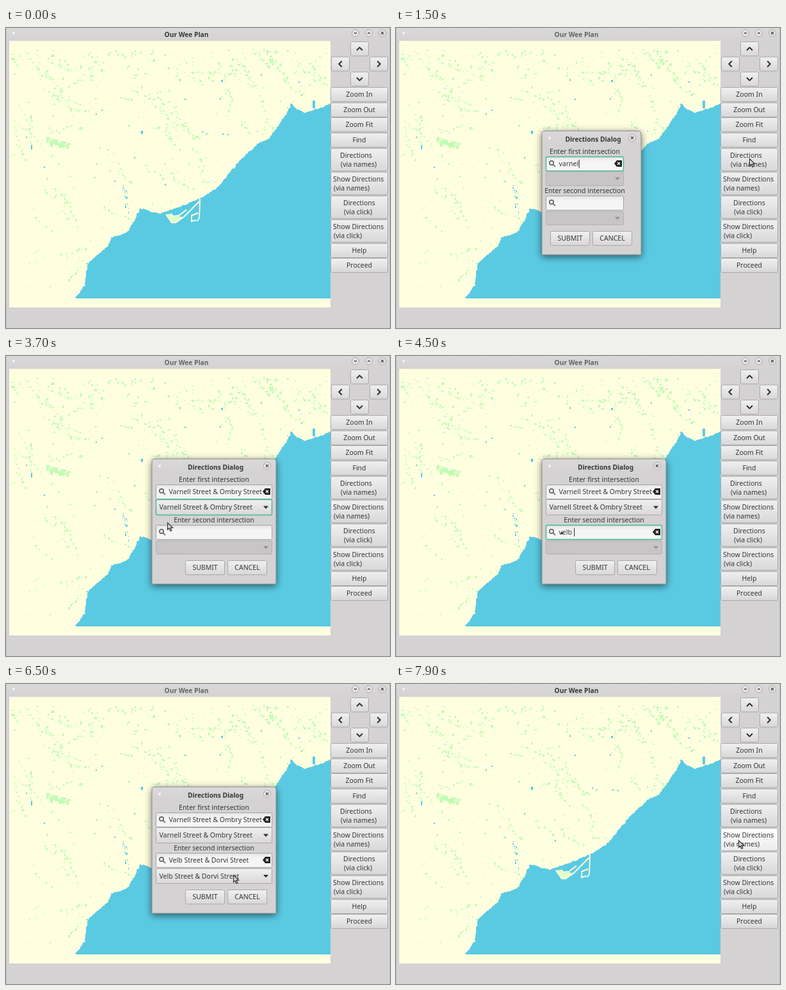
An HTML page that plays this animation: 600x467 px, repeating every 8 s.

```html
<!DOCTYPE html>
<html lang="en">
<head>
<meta charset="utf-8">
<title>Map directions</title>
<style>
  html, body { margin: 0; width: 100%; height: 100%; overflow: hidden; background: #d4d2d3; }
  svg { display: block; width: 100%; height: 100%; }
  text { font: 10.5px "Noto Sans", "Open Sans", sans-serif; fill: #33383a; white-space: pre; }
  .bold { font-size: 10.2px; font-weight: 700; }
  .mid { text-anchor: middle; }
  .btn { fill: url(#face); stroke: #a9a7a8; }
  .btn.hover { fill: url(#lit); }
  .off { fill: #c7c5c6; stroke: #b3b1b2; }
  .entry { fill: url(#field); stroke: #a5a3a4; }
  .focus { stroke: #48b98f; stroke-width: 1.4; }
  .window { filter: drop-shadow(0 3px 6px rgba(0, 0, 0, .55)); }
  .specks { shape-rendering: crispEdges; }
  .line { fill: none; stroke: #2c3032; stroke-width: 2; }
  .ring { fill: #e6e4e5; stroke: #aaa8a9; }
  .mark { fill: none; stroke: #444; stroke-width: 1.1; }
  .lens { fill: none; stroke: #666; stroke-width: 1.7; }
</style>
</head>
<body>
<svg viewBox="0 0 600 467" preserveAspectRatio="none">
  <defs>
    <linearGradient id="face" x2="0" y2="1"><stop stop-color="#f1f0f0"/><stop offset="1" stop-color="#d9d7d8"/></linearGradient>
    <linearGradient id="lit" x2="0" y2="1"><stop stop-color="#fff"/><stop offset="1" stop-color="#ecebeb"/></linearGradient>
    <linearGradient id="field" x2="0" y2="1"><stop stop-color="#e6e5e5"/><stop offset=".35" stop-color="#f6f5f5"/></linearGradient>
    <linearGradient id="bar" x2="0" y2="1"><stop stop-color="#dad8d9"/><stop offset="1" stop-color="#d4d2d3"/></linearGradient>
  </defs>
  <rect width="600" height="467" fill="#d4d2d3"/>
  <rect width="600" height="20" fill="url(#bar)"/>
  <path d="M.5 0V467M599.5 0V467" stroke="#c2c0c1"/>
  <g id="map"></g>
  <g id="panel"></g>
  <g id="dialog"></g>
  <g id="pointer"></g>
</svg>
<script>
const LOOP = 8000, STEP = 100;
const TITLE = 'Our Wee Plan';
const FIRST = 'Varnell Street & Ombry Street';
const SECOND = 'Velb Street & Dorvi Street';
const OPEN = 700, TYPE1 = 1000, MATCH1 = 2600, PICK1 = 3500;
const FOCUS2 = 4000, TYPE2 = 4100, MATCH2 = 5600, PICK2 = 6300, CLOSE = 7100;

const $ = id => document.getElementById(id);
const safe = s => s.replace(/&/g, '&amp;');
const text = (x, y, s, cls = '') => `<text x="${x}" y="${y}" class="${cls}">${safe(s)}</text>`;
const box = (x, y, w, h, cls) =>
  `<rect x="${x + .5}" y="${y + .5}" width="${w - 1}" height="${h - 1}" rx="2" class="${cls}"/>`;

let seed = 41;
function rnd() {
  seed = (seed + 0x6D2B79F5) | 0;
  let r = Math.imul(seed ^ (seed >>> 15), 1 | seed);
  r = (r + Math.imul(r ^ (r >>> 7), 61 | r)) ^ r;
  return ((r ^ (r >>> 14)) >>> 0) / 4294967296;
}
const spread = n => (rnd() * 2 - 1) * n;

function speck(x, y, max) {
  if (x < 5 || x > 502 || y < 33 || y > 417) return '';
  const w = 1 + Math.floor(rnd() * max), h = 1 + Math.floor(rnd() * max);
  return `M${Math.round(x)} ${Math.round(y)}h${w}v${h}h${-w}z`;
}

// A broken trail of specks that meanders towards the shore.
function creek(x, y, length) {
  let d = '', turn = 0;
  const course = .95 + spread(.6);
  for (let s = 0; s < length; s += 2) {
    turn = turn * .9 + spread(.45);
    x += Math.cos(course + turn) * 2;
    y += Math.sin(course + turn) * 2;
    if (rnd() < .5) d += speck(x + spread(2), y + spread(2), 3);
  }
  return d;
}
function scatter(n, top, depth, max) {
  let d = '';
  for (let i = 0; i < n; i++) d += speck(5 + rnd() * 497, top + rnd() * depth, max);
  return d;
}

const COAST = `507,117 494,124 478,128 468,132 453,126 446,118 440,130 429,147 410,173 395,179
  364,208 329,250 304,265 271,279 240,289 210,281 200,300 189,319 164,326 160,339 128,366 123,400 109,420`;

function ragged(line) {
  const shore = line.split(/\s+/).map(p => p.split(',').map(Number));
  let d = 'M507 421V117';
  shore.slice(1).forEach(([bx, by], i) => {
    const [ax, ay] = shore[i], n = Math.ceil(Math.hypot(bx - ax, by - ay) / 2.5);
    for (let k = 1; k <= n; k++) {
      d += `L${(ax + (bx - ax) * k / n + spread(1)).toFixed(1)} ${(ay + (by - ay) * k / n + spread(1)).toFixed(1)}`;
    }
  });
  return d + 'L109 421z';
}

function drawMap() {
  let green = scatter(280, 33, 380, 2) + scatter(110, 33, 50, 4);
  for (let i = 0; i < 75; i++) green += creek(rnd() * 500, 33 + rnd() * rnd() * 370, 25 + rnd() * 65);
  let patch = '';
  for (let i = 0; i < 70; i++) {
    const k = rnd();
    patch += speck(63 + k * 32 + spread(2), 174 + k * 8 + spread(4), 5);
  }
  const blue = scatter(90, 35, 370, 2) + creek(168, 236, 60);
  $('map').innerHTML = `<rect x="5" y="20" width="502" height="415" fill="#ffffe0"/>
    <g class="specks">
      <path d="${green}${patch}" fill="#bffcb2"/>
      <path d="${blue}M211 160h3v5h-3zM39 182h2v7h-2zM336 81h3v3h-3z" fill="#5acae3"/>
      <path d="${ragged(COAST)}M479 113h4v12h-4z" fill="#5acae3"/>
    </g>
    <path d="M250 290l8-1 3 5 9-1 8 2-8 5-7 3-5-1z" fill="#dffdc9"/>
    <path d="M250 290l9 13 6 0 13-9 24-24M258 289l3 4 9-1 12-9M303 266l-1 30-4 5M300 288l-10 4v9l7-2"
      fill="none" stroke="#ffffe0" stroke-width="2"/>`;
}

// Two-line labels give the left edge of their text.
const BUTTONS = [
  { lines: ['Zoom In'] }, { lines: ['Zoom Out'] }, { lines: ['Zoom Fit'] }, { lines: ['Find'] },
  { lines: ['Directions', '(via names)'], x: 522 }, { lines: ['Show Directions', '(via names)'], x: 511 },
  { lines: ['Directions', '(via click)'], x: 527 }, { lines: ['Show Directions', '(via click)'], x: 511 },
  { lines: ['Help'] }, { lines: ['Proceed'] },
];
const CROSS = 'M-2-2L2 2M2-2L-2 2';
const RINGS = ['M-2-1L0 1L2-1', 'M-2 1L0-1L2 1', CROSS];
const ring = (x, y, d) =>
  `<g transform="translate(${x} ${y})"><circle r="5.5" class="ring"/><path d="${d}" class="mark"/></g>`;

function arrow(turn) {
  const a = turn * Math.PI / 2;
  const x = 538 + Math.round(Math.sin(a)) * 30, y = 44.5 - Math.round(Math.cos(a)) * 23.5;
  return box(x, y, 29, 23, 'btn') +
    `<path d="M-4.5 2.3L0-2.2L4.5 2.3" transform="translate(${x + 14.5} ${y + 11.5}) rotate(${turn * 90})" class="line"/>`;
}

function panel(active, mx, my) {
  let s = `<g opacity="${active ? 1 : .72}">${text(282, 13.5, TITLE, 'bold mid')}</g>
    <circle cx="12" cy="8" r="2" fill="#f6f5f5"/>`;
  RINGS.forEach((d, i) => { s += ring(546 + i * 21, 8, d); });
  for (let turn = 0; turn < 4; turn++) s += arrow(turn);
  let top = 92;
  for (const { lines, x } of BUTTONS) {
    const pitch = x ? 37 : 23.7, y = Math.round(top);
    const hover = active && mx > 507 && mx < 597 && my > y && my < y + pitch;
    s += box(507, y, 90, x ? 36 : 23, hover ? 'btn hover' : 'btn');
    lines.forEach((label, i) => {
      s += x ? text(x + i, y + 15 + i * 14, label) : text(552, y + 15.3, label, 'mid');
    });
    top += pitch;
  }
  return s;
}

function entry(y, w, value, focus) {
  let s = box(234, y, w, 23, focus ? 'entry focus' : 'entry') +
    `<g class="lens"><circle cx="243" cy="${y + 10}" r="3.2"/><path d="M245.5 ${y + 12.5}l3.5 3.5"/></g>`;
  if (value) {
    const x = 234 + w - 15, cy = y + 11;
    s += text(254.5, y + 14.8, value, focus ? 'typed' : '') +
      `<path d="M${x} ${cy}l4-5h8v10h-8z" fill="#222"/>
       <path d="M${x + 5} ${cy - 2}l4 4m0-4l-4 4" stroke="#fff" stroke-width="1.3"/>`;
  }
  if (focus) s += `<path class="caret" data-y="${y + 5}" d="M255 ${y + 5}v13" stroke="#222"/>`;
  return s;
}

function combo(y, w, h, on, value, focus) {
  const cy = y + h / 2;
  return box(234, y, w, h, (on ? 'btn' : 'off') + (focus ? ' focus' : '')) +
    (value ? text(239.5, cy + 3.8, value) : '') +
    `<path d="M${234 + w - 14} ${cy - 2}h8l-4 4.5z" fill="${on ? '#2c3032' : '#929091'}"/>`;
}

const button = (x, y, label) => box(x, y, 62, 23, 'btn') + text(x + 31, y + 15.3, label, 'mid');

const typed = (t, start, full, limit) =>
  full.toLowerCase().slice(0, Math.max(0, Math.min(limit, (t - start) / 100 + 1)));

function dialog(t) {
  if (t < OPEN || t >= CLOSE) return '';
  const one = t >= PICK1, two = t >= PICK2;
  const w = one ? 194 : 155, right = 228 + w, field = one ? 182 : 122;
  const middle = 234 + field / 2;
  const drop = one ? 2 : 0, grown = drop + (two ? 2 : 0), bottom = 353 + grown;
  const value1 = one ? FIRST : typed(t, TYPE1, FIRST, 18);
  const value2 = two ? SECOND : typed(t, TYPE2, SECOND, 15);
  return `<g class="window"><path d="M228 ${bottom}V165q0-5 5-5H${right - 5}q5 0 5 5V${bottom}z" fill="#d4d2d3" stroke="#8f8d8e"/></g>
    <rect x="229" y="162" width="${w - 2}" height="18" fill="url(#bar)"/>
    <circle cx="240" cy="171" r="2" fill="#f6f5f5"/>` +
    text(228 + w / 2 + 2.5, 176.5, 'Directions Dialog', 'bold mid') +
    ring(right - 14, 171, CROSS) +
    text(middle, 195.5, 'Enter first intersection', 'mid') +
    entry(200, field, value1, !one) +
    combo(223, field, 23 + drop, t >= MATCH1, one && FIRST, one && t < FOCUS2) +
    text(middle, 257 + drop, 'Enter second intersection', 'mid') +
    entry(261 + drop, field, value2, t >= FOCUS2 && !two) +
    combo(285 + drop, field, 22 + grown - drop, t >= MATCH2, two && SECOND, false) +
    button(right - 142, 316 + grown, 'SUBMIT') + button(right - 76, 316 + grown, 'CANCEL');
}

// Where the pointer rests, from its arrival until it leaves.
const STOPS = [
  { from: 0, to: 100, x: 604, y: 320 },
  { from: 500, to: 2750, x: 552, y: 203 },
  { from: 3300, to: 3400, x: 296, y: 236 },
  { from: 3650, to: 3750, x: 252, y: 259 },
  { from: 3950, to: MATCH2, x: 258, y: 275 },
  { from: 6500, to: 6550, x: 355, y: 297 },
  { from: 6900, to: 7150, x: 312, y: 332 },
  { from: 7700, to: LOOP, x: 535, y: 243 },
];
function pointerAt(t) {
  const i = STOPS.findIndex(s => t <= s.to), b = STOPS[i], a = STOPS[i - 1];
  if (t >= b.from) return [b.x, b.y];
  const k = (t - a.to) / (b.from - a.to), e = k * k * (3 - 2 * k);
  return [a.x + (b.x - a.x) * e, a.y + (b.y - a.y) * e];
}
function pointer(t, x, y) {
  const shape = t >= TYPE2 && t < MATCH2
    ? '<circle cx="1.5" cy="1" r="1.5" fill="#111"/>'
    : '<path d="M.5.5V11.5L3 9.2L5 13.4L6.9 12.5L5 8.5H8.6z" fill="#d8d6d7" stroke="#2a2a2a" stroke-width="1.1"/>';
  return `<g transform="translate(${x.toFixed(1)} ${y.toFixed(1)})">${shape}</g>`;
}

function render(t) {
  const [x, y] = pointerAt(t);
  $('panel').innerHTML = panel(t < OPEN || t >= CLOSE, x, y);
  $('dialog').innerHTML = dialog(t);
  $('pointer').innerHTML = pointer(t, x, y);
  const caret = document.querySelector('.caret'), value = document.querySelector('.typed');
  if (caret && value) caret.setAttribute('d', `M${255.5 + value.getComputedTextLength()} ${caret.dataset.y}v13`);
}

drawMap();
const start = performance.now();
let last = -1;
function tick() {
  const t = Math.floor(((performance.now() - start) % LOOP) / STEP) * STEP;
  if (t !== last) render(last = t);
  requestAnimationFrame(tick);
}
tick();
</script>
</body>
</html>
```
